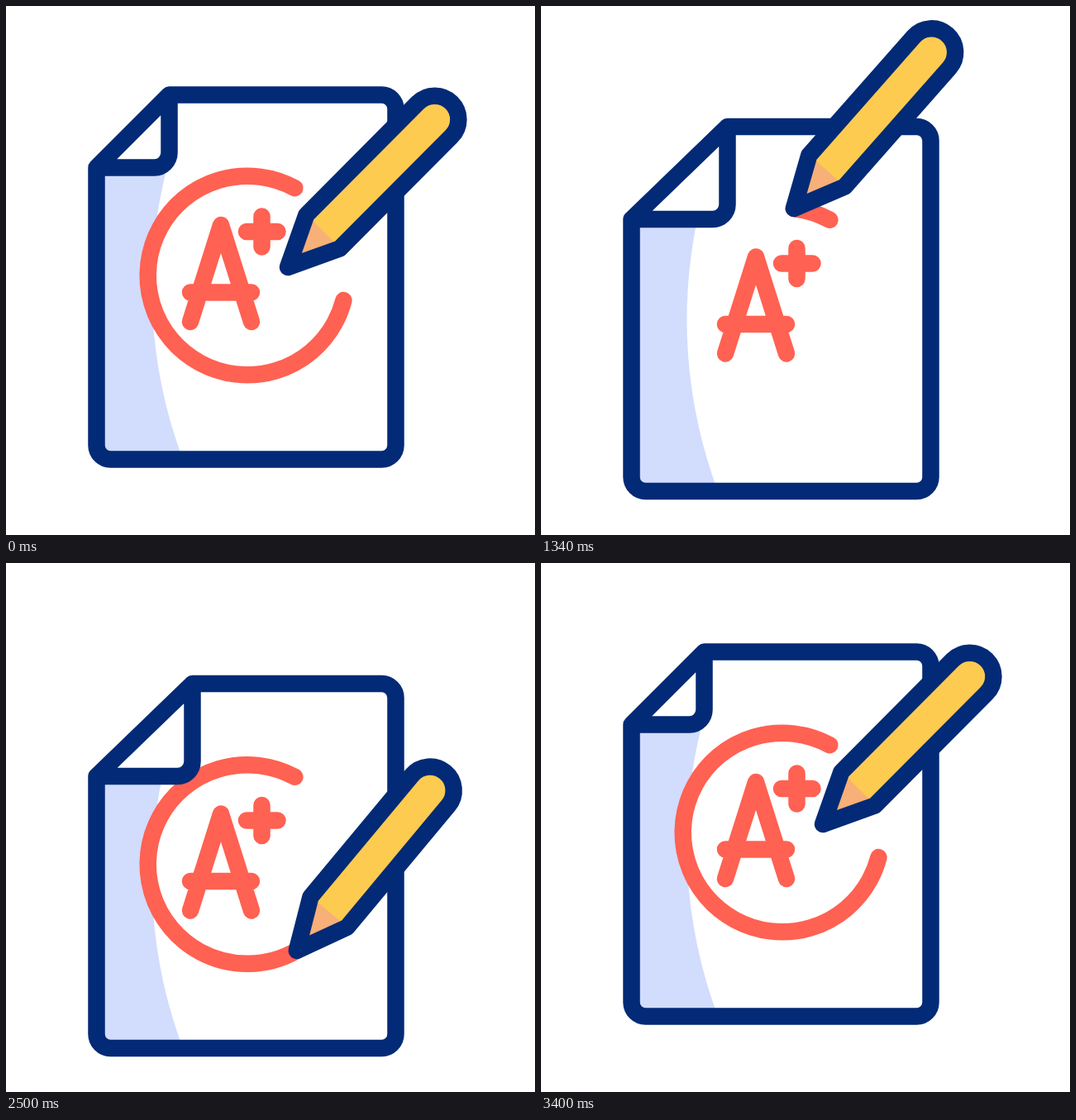
An HTML page with a canvas that plays this animation: 640 px wide and 640 px high, repeating every 3620 ms.

```html
<!DOCTYPE html>
<html lang="en">
<head>
<meta charset="utf-8">
<title>Graded paper</title>
<style>
html, body { margin: 0; width: 100%; height: 100%; overflow: hidden; background: #fff; }
canvas { display: block; }
</style>
</head>
<body>
<canvas id="stage" width="640" height="640"></canvas>
<script>
const ctx = document.getElementById('stage').getContext('2d');
const NAVY = '#032a76', RED = '#ff6152', BLUE = '#d2dcfd', YELLOW = '#fdcb50', PEACH = '#f6b078';
const LOOP = 3620, START = 220, DRAW = 970, DRAWN = 3040, END = 3400;
const DROP = 38.5, REST = { x: 341, y: 316 };
const RING = { x: 292, y: 326, r: 120.3, from: -61.5 };

// Degrees of the ring drawn: time, angle, speed
const SWEEP = [
  [DRAW, 0, 0], [1340, 21.8, .115], [1860, 114.7, .2], [2180, 179.6, .205],
  [2920, 281, .039], [DRAWN, 284, 0]
];

const rad = d => d * Math.PI / 180;
const mix = (a, b, p) => a + (b - a) * p;
const span = (t, a, b) => Math.min(1, Math.max(0, (t - a) / (b - a)));
const smooth = u => (1 - Math.cos(Math.PI * u)) / 2;
const easeOut = (u, n) => 1 - (1 - u) ** n;

function sweepAt(t) {
  if (t <= DRAW) return 0;
  if (t >= DRAWN) return 284;
  const i = SWEEP.findIndex(k => k[0] > t);
  const [t0, s0, v0] = SWEEP[i - 1], [t1, s1, v1] = SWEEP[i];
  const h = t1 - t0, u = (t - t0) / h, w = 1 - u;
  return s0 * w * w * (1 + 2 * u) + s1 * u * u * (3 - 2 * u) + h * u * w * (v0 * w - v1 * u);
}

function ringPoint(sweep) {
  const a = rad(RING.from - sweep);
  return { x: RING.x + RING.r * Math.cos(a), y: RING.y + DROP + RING.r * Math.sin(a) };
}

function stroke(color, d) {
  ctx.strokeStyle = color;
  ctx.stroke(new Path2D(d));
}

function fill(color, d) {
  ctx.fillStyle = color;
  ctx.fill(new Path2D(d));
}

function drawRing(sweep, alpha) {
  ctx.globalAlpha = alpha;
  ctx.strokeStyle = RED;
  ctx.beginPath();
  ctx.arc(RING.x, RING.y, RING.r, rad(RING.from), rad(RING.from - sweep), true);
  ctx.stroke();
  ctx.globalAlpha = 1;
}

function drawPaper(t, p) {
  const fx = 197.5 + 28 * p, fy = 195.5 + 24 * p;
  const shadeX = 767.5 - Math.sqrt(591 ** 2 - (fy - 341) ** 2);
  ctx.save();
  ctx.translate(0, DROP * p);
  fill(BLUE, `M109.5 ${fy}H${shadeX}A591 591 0 0 0 214 548.5H109.5Z`);
  if (t < DRAW) drawRing(284, 1 - smooth(span(t, START, DRAW)));
  else drawRing(sweepAt(t), 1);
  stroke(RED, 'M223 382L260 265L297 382M223 346.5H297M291 273H328.5M309.5 254.5V291.5');
  stroke(NAVY, `M${fx} 107.5H454.5a17 17 0 0 1 17 17V531.5a17 17 0 0 1 -17 17
    H126.5a17 17 0 0 1 -17 -17V${fy}ZV${fy - 18}a18 18 0 0 1 -18 18H109.5`);
  ctx.restore();
}

function pencilTip(t) {
  if (t < DRAW) {
    const u = span(t, START, DRAW), to = ringPoint(0);
    return { x: mix(REST.x, to.x, easeOut(u, 3)), y: mix(REST.y, to.y, easeOut(u, 2.8)) };
  }
  const on = ringPoint(sweepAt(t)), back = smooth(span(t, DRAWN, END));
  return { x: mix(on.x, REST.x, back), y: mix(on.y, REST.y, back) };
}

function drawPencil(t) {
  const tip = pencilTip(t);
  const tilt = 45.15 + 14 * Math.sin(Math.PI * span(t, 985, 2935)) ** 2.3;
  ctx.save();
  ctx.translate(tip.x, tip.y);
  ctx.rotate(-rad(tilt));
  const body = 'M0 0L60.5 -28.7H252a28.7 28.7 0 0 1 0 57.4H60.5Z';
  fill(YELLOW, body);
  fill(PEACH, 'M0 0L61 -28.7V28.7Z');
  stroke(NAVY, body);
  ctx.restore();
}

function frame(now) {
  const t = now % LOOP;
  const p = easeOut(span(t, START, DRAW), 3) - smooth(span(t, DRAWN, END));
  ctx.clearRect(0, 0, 640, 640);
  ctx.lineWidth = 20.5;
  ctx.lineCap = ctx.lineJoin = 'round';
  drawPaper(t, p);
  drawPencil(t);
}

const begin = performance.now();
function tick() {
  frame(performance.now() - begin);
  requestAnimationFrame(tick);
}
tick();
</script>
</body>
</html>
```
